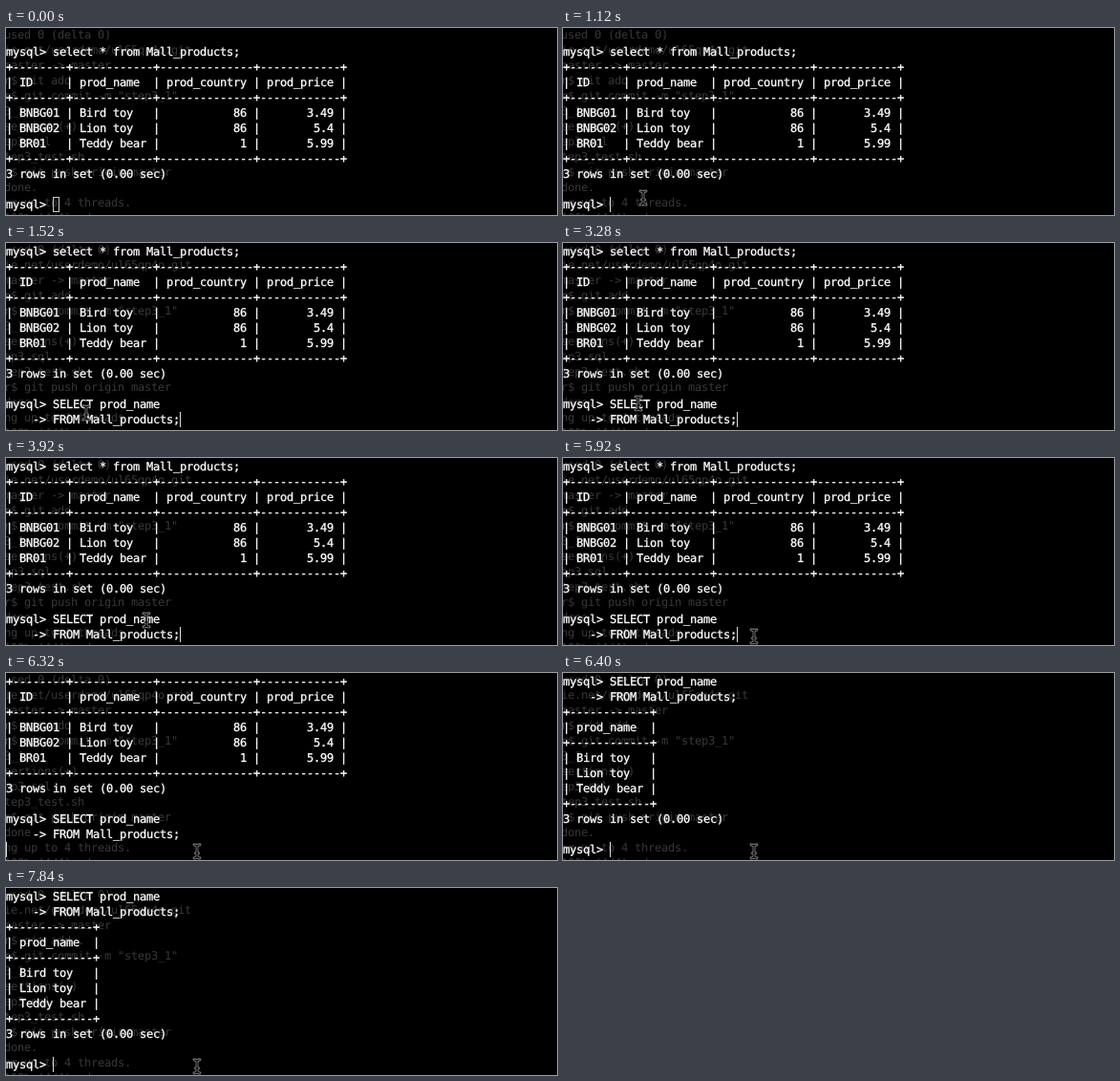
Animation, 577 px wide and 196 px high, one loop 8000 ms. Source, as an HTML page:

```html
<!DOCTYPE html>
<html lang="en">
<head>
<meta charset="utf-8">
<title>Terminal query</title>
<style>
  html, body { margin: 0; width: 100%; height: 100%; overflow: hidden; background: #000; }
  .stage { position: relative; width: 577px; height: 196px; overflow: hidden; background: #000; }
  pre {
    margin: 0;
    font: 12px/16px "DejaVu Sans Mono", monospace;
    letter-spacing: -.224px;
    text-rendering: geometricPrecision;
    color: #fff;
  }
  .behind { position: absolute; left: -2px; top: -1px; color: #383838; }
  .screen { position: absolute; left: 0; top: 1px; width: 577px; height: 192px; overflow: hidden; }

  /* 1% of the loop is 80 ms */
  .screen pre, .typed, .answer, .box, .caret { animation: 8s step-end infinite; }
  .screen pre { -webkit-text-stroke: .3px #fff; animation-name: scroll; }
  .typed { animation-name: type; }
  .answer { animation-name: answer; }
  .box {
    position: absolute; left: 49px; top: 177px; width: 7px; height: 16px;
    box-sizing: border-box; border: 1px solid #ccc;
    animation-name: unfocus;
  }
  .caret {
    position: absolute; left: 0; top: 177px; width: 1px; height: 16px;
    background: #ddd; animation-name: caret;
  }
  .pointer {
    position: absolute; left: -6px; top: -9px; width: 12px; height: 18px;
    fill: none; stroke-linecap: round;
    animation: point 8s infinite;
  }

  @keyframes scroll {
    0% { transform: translateY(0); }
    19% { transform: translateY(-16px); }
    79% { transform: translateY(-32px); }
    80%, 100% { transform: translateY(-176px); }
  }
  @keyframes type {
    0% { visibility: hidden; }
    19%, 100% { visibility: visible; }
  }
  @keyframes answer {
    0% { visibility: hidden; }
    80%, 100% { visibility: visible; }
  }
  @keyframes unfocus {
    0% { opacity: 1; }
    8%, 100% { opacity: 0; }
  }
  @keyframes caret {
    0% { opacity: 0; transform: translateX(49px); }
    14% { opacity: 1; transform: translateX(49px); }
    19%, 38%, 58%, 74% { opacity: 1; transform: translateX(182px); }
    32%, 51%, 68% { opacity: 0; transform: translateX(182px); }
    79% { opacity: 1; transform: translateX(0); }
    80%, 98%, 100% { opacity: 1; transform: translateX(49px); }
    92% { opacity: 0; transform: translateX(49px); }
  }
  @keyframes point {
    0% { opacity: 0; transform: translate(175px, 190px); animation-timing-function: step-end; }
    3% { opacity: 1; transform: translate(175px, 190px); animation-timing-function: steps(6); }
    9% { transform: translate(123px, 62px); animation-timing-function: step-end; }
    13% { transform: translate(97px, 138px); animation-timing-function: step-end; }
    14%, 37% { transform: translate(84px, 178px); animation-timing-function: step-end; }
    38% { transform: translate(83px, 175px); animation-timing-function: steps(3); }
    41% { transform: translate(79px, 168px); animation-timing-function: steps(7); }
    48% { transform: translate(150px, 168px); animation-timing-function: step-end; }
    49% { transform: translate(147px, 170px); animation-timing-function: steps(8); }
    57% { transform: translate(104px, 187px); animation-timing-function: steps(2); }
    59% { transform: translate(110px, 187px); animation-timing-function: steps(9); }
    68%, 100% { opacity: 1; transform: translate(200px, 187px); }
  }
</style>
</head>
<body>
<div class="stage">
<pre class="behind">used 0 (delta 0)
ie.net/userdemo/ul65qp4o.git
master -&gt; master
r$ git add .
r$ git commit -m "step3_1"
3_1
sertions(+)
ep3.sql
tep3_test.sh
r$ git push origin master
done.
ng up to 4 threads.
100% (4/4), done.</pre>
<div class="screen"><pre>&nbsp;
mysql&gt; select * from Mall_products;
+--------+------------+--------------+------------+
| ID     | prod_name  | prod_country | prod_price |
+--------+------------+--------------+------------+
| BNBG01 | Bird toy   |           86 |       3.49 |
| BNBG02 | Lion toy   |           86 |        5.4 |
| BR01   | Teddy bear |            1 |       5.99 |
+--------+------------+--------------+------------+
3 rows in set (0.00 sec)

mysql&gt; <span class="typed">SELECT prod_name</span>
    -&gt; FROM Mall_products;
<span class="answer">+------------+
| prod_name  |
+------------+
| Bird toy   |
| Lion toy   |
| Teddy bear |
+------------+
3 rows in set (0.00 sec)

mysql&gt; </span></pre></div>
<div class="box"></div>
<div class="caret"></div>
<svg class="pointer" viewBox="-6 -9 12 18">
  <defs><path id="beam" d="M-3-7Q0-7 0-5Q0-7 3-7M0-5V5M-3 7Q0 7 0 5Q0 7 3 7M-1.5 2H1.5"/></defs>
  <use href="#beam" stroke="#8c8c8c" stroke-width="2.8"/>
  <use href="#beam" stroke="#000" stroke-width="1.2"/>
</svg>
</div>
</body>
</html>
```
